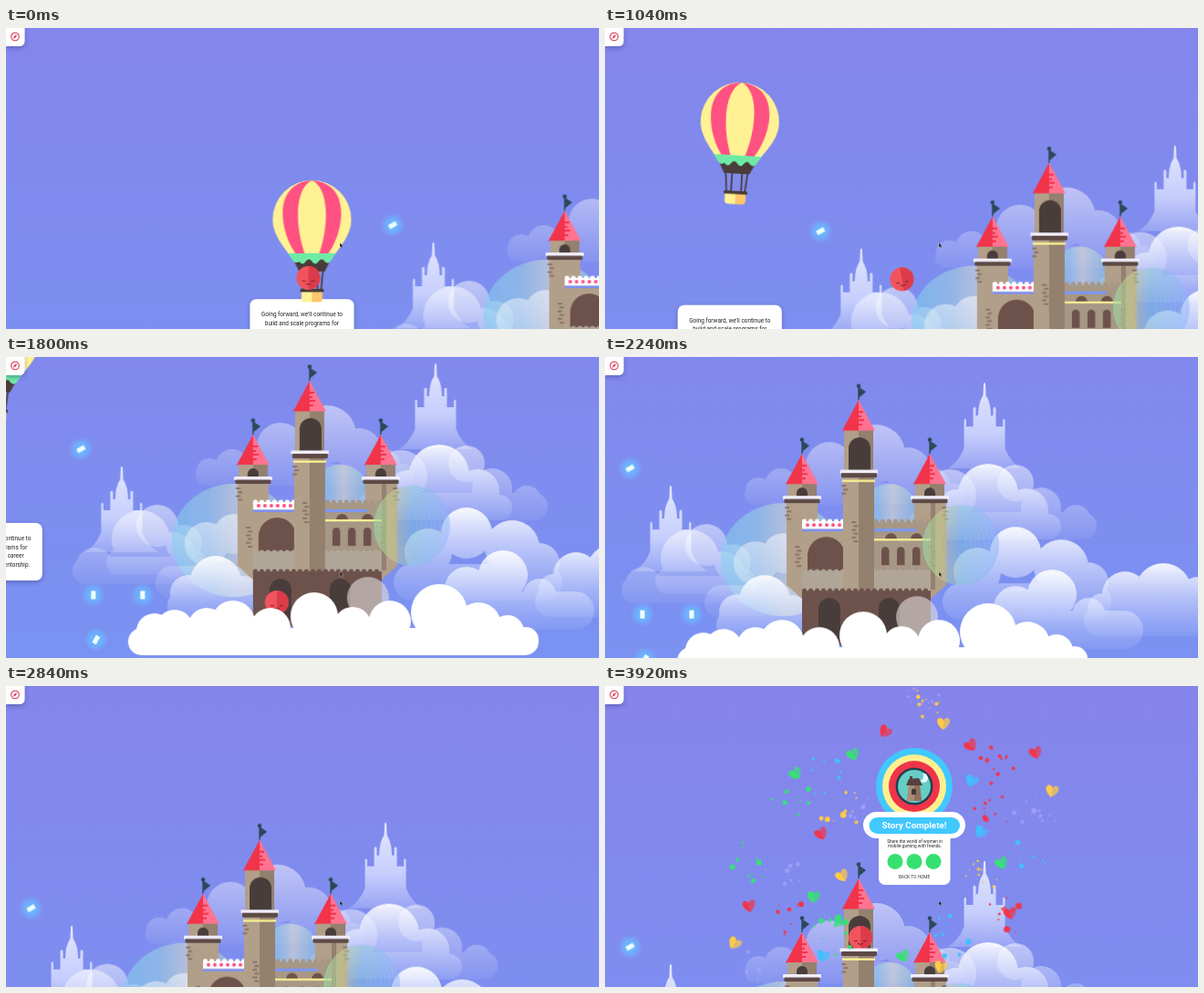
An HTML page that plays this animation: 650x330 px, repeating every 3.96 s.

```html
<!DOCTYPE html>
<html lang="en">
<head>
<meta charset="utf-8">
<title>Balloon to the castle</title>
<style>
html, body { margin: 0; width: 100%; height: 100%; overflow: hidden; background: #7f89ee; }
svg { display: block; width: 650px; height: 330px; }
text { font-family: Roboto, Arial, sans-serif; text-anchor: middle; }
.a { animation: 3.96s linear infinite; }

/* camera */
.camx { animation-name: camx; }
.camy { animation-name: camy; }
@keyframes camx {
  0% { transform: translateX(396.5px); animation-timing-function: cubic-bezier(.33,.2,.67,.63); }
  16.16% { transform: translateX(289px); }
  35.35% { transform: translateX(137px); }
  45.45% { transform: translateX(55px); animation-timing-function: cubic-bezier(.3,.48,.6,1); }
  56.57%, 100% { transform: none; }
}
@keyframes camy {
  0% { transform: translateY(94px); animation-timing-function: cubic-bezier(.3,.3,.5,1); }
  16.16% { transform: translateY(191px); animation-timing-function: cubic-bezier(.35,.1,.65,.81); }
  35.35% { transform: translateY(11.5px); animation-timing-function: cubic-bezier(.3,.48,.6,1); }
  45.45% { transform: translateY(-21px); animation-timing-function: cubic-bezier(.6,0,.8,.38); }
  56.57% { transform: translateY(0); animation-timing-function: cubic-bezier(.33,.25,.67,.7); }
  71.72% { transform: translateY(121.5px); animation-timing-function: cubic-bezier(.3,.6,.6,1); }
  82.5%, 100% { transform: translateY(164px); }
}

/* balloon and traveller */
.lift { animation-name: lift; }
@keyframes lift {
  0% { transform: translate(-61px,116px); animation-timing-function: cubic-bezier(.3,.2,.5,1); }
  13%, 100% { transform: translate(-61px,2px) rotate(3.5deg); }
}
.bx { animation-name: bx; }
.by { animation-name: by; }
.spin { animation-name: spin; }
@keyframes bx {
  0% { transform: translateX(-65px); animation-timing-function: cubic-bezier(.45,0,.7,.6); }
  16.16% { transform: translateX(48px); }
  35.35% { transform: translateX(178px); }
  45.45% { transform: translateX(242px); }
  50%, 100% { transform: translateX(246px); }
}
@keyframes by {
  0% { transform: translateY(180px); animation-timing-function: cubic-bezier(.3,.2,.5,1); }
  11.5% { transform: translateY(72px); animation-timing-function: ease-in; }
  16.16% { transform: translateY(84px); animation-timing-function: cubic-bezier(.35,.15,.65,.8); }
  35.35% { transform: translateY(259.5px); animation-timing-function: cubic-bezier(.3,.48,.6,1); }
  45.45%, 100% { transform: translateY(290px); }
}
@keyframes spin {
  0%, 5% { transform: none; }
  16.16% { transform: rotate(-25deg); }
  33%, 46.5% { transform: none; }
  49.5%, 100% { transform: scale(0); }
}
.rise { animation-name: rise; }
@keyframes rise {
  0%, 75% { transform: translate(280px,142px); animation-timing-function: ease-out; }
  83%, 100% { transform: translate(280px,112px); }
}

/* finale */
.pop { animation-name: pop; }
@keyframes pop {
  0%, 84% { transform: scale(0); animation-timing-function: ease-out; }
  89.5% { transform: scale(1.07); }
  93%, 100% { transform: none; }
}
.party { animation-name: party; }
@keyframes party { 0%, 86% { visibility: hidden; } 86.01%, 100% { visibility: visible; } }
.fly { animation-name: fly; }
@keyframes fly {
  0%, 86% { transform: scale(0); animation-timing-function: cubic-bezier(.1,.6,.4,1); }
  97%, 100% { transform: translate(var(--x), var(--y)) rotate(var(--r)); }
}
</style>
</head>
<body>
<svg viewBox="0 0 650 330">
  <defs>
    <linearGradient id="sky" x1="0" y1="0" x2="0" y2="1">
      <stop stop-color="#8683ea"/><stop offset="1" stop-color="#7a93f2"/>
    </linearGradient>
    <linearGradient id="mist" x1="0" y1="0" x2="0" y2="1">
      <stop stop-color="#fff" stop-opacity=".5"/><stop offset="1" stop-color="#fff" stop-opacity=".06"/>
    </linearGradient>
    <linearGradient id="puff" x1="0" y1="0" x2="0" y2="1">
      <stop stop-color="#fff" stop-opacity=".92"/><stop offset="1" stop-color="#c9d6ff" stop-opacity=".12"/>
    </linearGradient>
    <linearGradient id="ghost" x1="0" y1="0" x2="0" y2="1">
      <stop stop-color="#e4e8ff"/><stop offset=".6" stop-color="#d3daff" stop-opacity=".85"/>
      <stop offset="1" stop-color="#d3daff" stop-opacity=".3"/>
    </linearGradient>
    <linearGradient id="film">
      <stop stop-color="#7ed0f0" stop-opacity=".55"/><stop offset=".3" stop-color="#9fdce0" stop-opacity=".5"/>
      <stop offset=".55" stop-color="#f2f0c8" stop-opacity=".5"/><stop offset="1" stop-color="#8fe0d0" stop-opacity=".4"/>
    </linearGradient>
    <linearGradient id="film2">
      <stop stop-color="#8fd8a8" stop-opacity=".6"/><stop offset=".25" stop-color="#c9c98a" stop-opacity=".55"/>
      <stop offset=".5" stop-color="#7fc4e0" stop-opacity=".5"/><stop offset="1" stop-color="#8fb4ff" stop-opacity=".5"/>
    </linearGradient>
    <radialGradient id="glow">
      <stop stop-color="#63c4ff"/><stop offset=".55" stop-color="#6cb4ff" stop-opacity=".75"/>
      <stop offset="1" stop-color="#7aa8ff" stop-opacity="0"/>
    </radialGradient>
    <filter id="soft" x="-20%" y="-20%" width="140%" height="150%">
      <feDropShadow dx="0" dy="2" stdDeviation="2.5" flood-color="#303878" flood-opacity=".45"/>
    </filter>
    <clipPath id="sill"><rect x="262" y="86" width="34" height="38"/></clipPath>
    <path id="spire" fill="url(#ghost)" d="M-1 1Q0-1 1 1L1.6 14Q7 22 7 36H9.5V28Q11 25 12.5 28V48H20V41Q21.2 38 22.5 41V72Q28 86 40 94H-40Q-28 86-22.5 72V41Q-21.2 38-20 41V48H-12.5V28Q-11 25-9.5 28V36H-7Q-7 22-1.6 14Z"/>
    <g id="roof">
      <path d="M0-16V0M1-13l6 4-6 5z" fill="#2c4a5a" stroke="#2c4a5a" stroke-width="1.4"/>
      <circle cy="-15.5" r="2.3" fill="#2c4a5a"/>
      <path d="M0 0L-18 33.500H0Z" fill="#f2344b"/><path d="M0 0L18 33.500H0Z" fill="#ff7391"/>
      <path d="M0 13h5M0 18h3M0 22h6M0 27h4" stroke="#f2344b" stroke-width="2"/>
    </g>
    <g id="face">
      <circle r="13" fill="#f2545d"/><path d="M0-13a13 13 0 0 1 0 26z" fill="#dc3c4a"/>
      <path d="M-7 3q2 2 4 0M3 3q2 2 4 0M-3 6q3 3 6 0" fill="none" stroke="#7c1f30"/>
    </g>
    <g id="token"><circle r="14" fill="url(#glow)"/><rect x="-4.500" y="-2.500" width="9" height="5" fill="#f1fffb"/></g>
    <g id="heart">
      <path d="M0 7C-9 1-8-6-4-6Q-1-6 0-3Z"/><path d="M0 7C9 1 8-6 4-6Q1-6 0-3Z" opacity=".72"/>
    </g>
  </defs>

  <g class="a camx"><g class="a camy">
    <rect x="-500" y="-195" width="1300" height="550" fill="url(#sky)"/>
    <g id="back"></g>
    <g id="castle"></g>
    <g id="tokens"></g>
    <g filter="url(#soft)"><rect x="-129" y="203" width="114" height="63" rx="7" fill="#fff"/></g>
    <g id="note" font-size="6.4" fill="#222"></g>
    <g class="a lift">
      <path d="M-12 56L-10 78M-5 56V78M6 56V78M12 56L10 78" stroke="#4a3c3a" stroke-width="1.8"/>
      <path d="M-43 0A43 43 0 0 1 43 0C43 18 30 30 22 43H-22C-30 30-43 18-43 0Z" fill="#fff294"/>
      <path id="stripe" d="M0-43C-44-40-36 15-16 40H-7C-20 5-18-35 0-43Z" fill="#ff5182"/>
      <use href="#stripe" transform="scale(-1,1)"/>
      <path d="M-21 43H21L14 57H-14Z" fill="#4a3c3a"/>
      <path d="M-26 37H26L21 45q-3 5-7 1q-3-5-7 0q-3 5-7 0q-3-5-7 0q-3 5-7 0q-4 3-7-1Z" fill="#6eeaa5"/>
      <path d="M-11.500 79H0V90.500H-8Q-11 90.500-11.500 87Z" fill="#fff294"/>
      <path d="M11.500 79H0V90.500H8Q11 90.500 11.500 87Z" fill="#ffc66c"/>
      <rect x="-13" y="76" width="26" height="3.500" rx="1" fill="#4a3c3a"/>
    </g>
    <g class="a bx"><g class="a by"><g class="a spin"><use href="#face"/></g></g></g>
    <g id="front"></g>
  </g></g>

  <g id="party" class="a party"></g>

  <g transform="translate(339,143)"><g class="a pop"><g transform="translate(-339,-143)">
    <rect x="300" y="145" width="78.500" height="73" rx="7" fill="#fff"/>
    <circle cx="339" cy="110" r="42" fill="#40c8ff"/><circle cx="339" cy="110" r="35" fill="#fff08f"/>
    <circle cx="339" cy="110" r="28" fill="#f0344a"/><circle cx="339" cy="110" r="20.500" fill="#21404f"/>
    <circle cx="339" cy="110" r="18" fill="#66cdc4"/>
    <path d="M348 96a5 5 0 1 1-3 8a5 5 0 0 0 3-8z" fill="#e9f7ff"/>
    <path d="M333 108h12l2 18h-16z" fill="#a98b73"/><path d="M339 108h6l2 18h-8z" fill="#8d705f"/>
    <path d="M330 109l3-7 11-1 4 8z" fill="#54413f"/><path d="M334 103v-4h3v4z" fill="#54413f"/>
    <path d="M336 119v-4a2.500 2.500 0 0 1 5 0v4z" fill="#433637"/>
    <rect x="283" y="138" width="112" height="29" rx="14.500" fill="#fff"/>
    <rect x="289.500" y="144" width="99.500" height="18" rx="9" fill="#40c8ff"/>
    <text x="339" y="156.300" font-size="9.8" font-weight="700" fill="#fff">Story Complete!</text>
    <g font-size="4.8" fill="#222">
      <text x="339.500" y="171.500">Share the world of women in</text>
      <text x="339.500" y="177.200">mobile gaming with friends.</text>
      <text x="339" y="211" fill="#333">BACK TO HOME</text>
    </g>
    <g fill="#36e070"><circle cx="318" cy="192.500" r="8.500"/><circle cx="339" cy="192.500" r="8.500"/><circle cx="360" cy="192.500" r="8.500"/></g>
  </g></g></g>

  <path d="M0 0H20.500V14Q20.500 20 14 20H0Z" fill="#fff" filter="url(#soft)"/>
  <circle cx="10" cy="9.500" r="4.300" fill="none" stroke="#dd3450" stroke-width="1.100"/>
  <path d="M12.500 7L10.800 10.300 7.500 12 9.200 8.700Z" fill="#dd3450"/>
  <path d="M366 235.500v5l1.200-1 .9 2 1-.5-.9-1.800h1.500z" fill="#111" stroke="#fff" stroke-width=".3"/>
</svg>

<script>
const $ = id => document.getElementById(id);
const rect = (x, y, w, h, fill, rx = 0) => `<rect x="${x}" y="${y}" width="${w}" height="${h}" rx="${rx}" fill="${fill}"/>`;
const path = (d, fill) => `<path d="${d}" fill="${fill}"/>`;
const range = (n, f) => Array.from({ length: n }, (_, i) => f(i)).join('');

// Union of circles and a rounded base, filled as one shape.
const cloud = (puffs, x, y, w, h, fill) => {
  const r = h / 2;
  const bumps = puffs.map(([cx, cy, q]) => `M${cx - q} ${cy}a${q} ${q} 0 1 1 ${2 * q} 0a${q} ${q} 0 1 1 ${-2 * q} 0`).join('');
  return path(`${bumps}M${x + r} ${y}h${w - h}a${r} ${r} 0 0 1 0 ${h}h${h - w}a${r} ${r} 0 0 1 0 ${-h}z`, fill);
};
const arch = (x, top, w, bottom, fill) =>
  path(`M${x} ${bottom}V${top + w / 2}a${w / 2} ${w / 2} 0 0 1 ${w} 0V${bottom}Z`, fill);
const bricks = (x, y, n, fill = '#8a7566') => range(n, i => rect(x + (i % 2) * 2, y + i * 4.2, 5.5, 2, fill, 1));
const merlons = (x, y, w, fill) => range(Math.round(w / 7), i => rect(x + i * 7, y - 3.5, 5, 7, fill, 2));

const TAN = '#b29f8a', DIM = '#93806f', DARK = '#493d3b', BROWN = '#6d524c', STONE = '#b0a698';

$('back').innerHTML =
  cloud([[168, 146, 14], [193, 140, 18], [246, 119, 26], [297, 106, 32], [332, 124, 25], [360, 140, 18]], 153, 138, 240, 24, 'url(#mist)') +
  '<use href="#spire" x="416" y="28"/><use href="#spire" x="72" y="141"/>' +
  cloud([[378, 152, 29], [450, 138, 20], [478, 165, 22], [516, 178, 16]], 330, 170, 209, 30, 'url(#mist)') +
  cloud([[420, 150, 33], [385, 165, 20], [462, 168, 24]], 350, 172, 150, 28, 'url(#puff)') +
  cloud([[111, 206, 23], [42, 250, 20], [140, 225, 20]], 18, 240, 150, 30, 'url(#mist)') +
  cloud([[93, 221, 32], [128, 238, 25]], 55, 232, 110, 28, 'url(#mist)') +
  cloud([[450, 214, 28], [408, 235, 26], [500, 230, 30], [530, 247, 22]], 370, 248, 185, 40, 'url(#puff)') +
  cloud([[612, 257, 31], [570, 260, 25], [650, 266, 25], [545, 275, 16], [690, 275, 24]], 525, 272, 210, 34, 'url(#puff)') +
  cloud([[490, 260, 27], [450, 275, 24], [530, 282, 18]], 400, 278, 190, 42, 'url(#puff)') +
  '<ellipse cx="195" cy="222" rx="68" ry="62" fill="url(#film)"/><circle cx="312" cy="170" r="31" fill="url(#film)"/>' +
  cloud([[165, 226, 24], [195, 215, 22], [123, 270, 14]], 110, 250, 110, 34, 'url(#mist)') +
  cloud([[175, 267, 28], [145, 280, 20], [205, 283, 22]], 122, 275, 110, 38, 'url(#puff)');

const sideTower = x => `<use href="#roof" x="${x}" y="106"/>` +
  rect(x - 16, 139, 16, 14, TAN) + rect(x, 139, 16, 14, DIM) + arch(x - 6, 143, 12, 153, DARK) +
  rect(x - 21, 152, 42, 4, '#f1eefb', 1) + rect(x - 19.5, 155.5, 39, 4.5, '#5d4a45', 1);

$('castle').innerHTML =
  path('M199 160H233V265H216L199 250Z', TAN) + path('M374 160H339V265H357L374 250Z', TAN) +
  rect(357, 160, 5, 95, DIM) +
  rect(216, 186, 46, 70, TAN) + arch(222, 197, 41, 240, BROWN) +
  merlons(216, 181, 48, '#fff') + rect(216, 180, 46, 8.5, '#fff') +
  range(6, i => `<circle cx="${222 + i * 7}" cy="184" r="2" fill="#ff5182"/>`) + rect(216, 188.5, 46, 2.5, '#7c8ff5') +
  merlons(295, 181, 62, '#a69885') + rect(295, 181, 62, 75, '#a69885') + rect(295, 188, 46, 3, '#7c96f5') +
  arch(307, 193, 13, 200, BROWN) + arch(335, 193, 13, 200, BROWN) + rect(295, 199, 62, 2.2, '#fff294') +
  range(3, i => arch(303 + i * 17, 208, 8.5, 228, BROWN)) +
  merlons(216, 236, 141, STONE) + rect(216, 234, 141, 24, STONE) +
  bricks(197, 164, 4) + bricks(208, 207, 6) + bricks(369, 164, 4) + bricks(355, 207, 6) +
  sideTower(216) + sideTower(356) +
  rect(261, 130, 17, 126, TAN) + rect(278, 130, 17, 126, DIM) + bricks(270, 180, 6) + bricks(259, 140, 3) +
  rect(262, 80, 16, 45, TAN) + rect(278, 80, 16, 45, DIM) + arch(267, 88, 24, 124, DARK) +
  '<use href="#roof" x="278" y="47"/>' +
  '<g clip-path="url(#sill)"><g class="a rise"><use href="#face"/></g></g>' +
  rect(257.5, 123.5, 41.5, 4, '#f1eefb', 1) + rect(259, 127, 39, 5, '#5d4a45', 1) + rect(260, 134.5, 36, 2.3, '#fff294') +
  merlons(216, 257, 141, BROWN) + rect(216, 256, 141, 60, BROWN) +
  arch(234, 264, 24, 310, DARK) + arch(300, 264, 23, 310, DARK) +
  '<ellipse cx="390" cy="206" rx="42" ry="44" fill="url(#film2)"/>' +
  range(7, i => `<ellipse cx="${388 - i}" cy="206" rx="${38 - i * 4}" ry="${42 - i * 3}" fill="none" stroke="#d8e8a0" stroke-opacity=".22" stroke-width=".7"/>`) +
  '<circle cx="342" cy="285" r="23" fill="#e4dedd" fill-opacity=".6"/>';

$('front').innerHTML = cloud(
  [[108, 322, 20], [130, 318, 20], [165, 316, 20], [194, 312, 24], [235, 318, 22], [283, 305, 26], [325, 316, 21],
   [366, 311, 23], [420, 301, 31], [463, 315, 25], [495, 322, 18], [515, 331, 14]], 79, 318, 450, 30, '#fff');

$('tokens').innerHTML = [[27.5, 122, -30], [-76, 283, 62], [41, 282, 90], [95, 282, 90], [44, 331, -60]]
  .map(([x, y, r]) => `<use href="#token" transform="translate(${x},${y}) rotate(${r})"/>`).join('');

$('note').innerHTML = ['Going forward, we’ll continue to', 'build and scale programs for', 'skills development, career', 'opportunities, and mentorship.']
  .map((s, i) => `<text x="-72" y="${222 + i * 9.7}">${s}</text>`).join('');

// Celebration: hearts leave the medal, dots burst in clusters.
let seed = 7;
const rnd = () => (seed = seed * 16807 % 2147483647) / 2147483647;
const inks = { r: '#f0364c', g: '#35e273', y: '#ffcb45', b: '#40c0ff', l: '#b9b6ff' };
const bit = (x, y, r, delay, body) =>
  `<g class="a fly" style="--x:${x}px;--y:${y}px;--r:${r}deg;animation-delay:${delay}ms">${body}</g>`;

const hearts = { r: [307,50, 401,65, 472,73, 237,162, 158,241, 444,249], g: [272,75, 209,96, 435,194, 229,231, 257,258, 327,296],
  y: [371,41, 490,115, 260,208, 142,282, 368,308], b: [402,104, 412,160, 239,296] };
const bursts = { r: [430,84, 424,135, 195,250, 437,256], g: [203,125, 160,190, 250,272], y: [348,24, 257,135, 408,212],
  b: [240,98, 465,182, 380,275], l: [348,12, 470,142, 197,207, 288,135, 160,310] };
const each = (set, f) => Object.entries(set).map(([k, p]) =>
  range(p.length / 2, i => f(p[2 * i], p[2 * i + 1], inks[k], k))).join('');

$('party').innerHTML =
  each(bursts, (x, y, ink, k) => {
    const delay = Math.round(rnd() * 80);
    return `<g transform="translate(${x},${y})" fill="${ink}" fill-opacity="${k === 'l' ? .5 : 1}">` + range(11, () => {
      const a = rnd() * 6.283, d = 5 + rnd() * 20;
      return bit((Math.cos(a) * d).toFixed(1), (Math.sin(a) * d).toFixed(1), 0, delay,
        `<circle r="${(.7 + rnd() * rnd() * 3).toFixed(1)}"/>`);
    }) + '</g>';
  }) +
  '<g transform="translate(339,110)">' +
  each(hearts, (x, y, ink) => bit(x - 339, y - 110, Math.round(rnd() * 80 - 40), 0, `<use href="#heart" fill="${ink}"/>`)) + '</g>';
</script>
</body>
</html>
```
